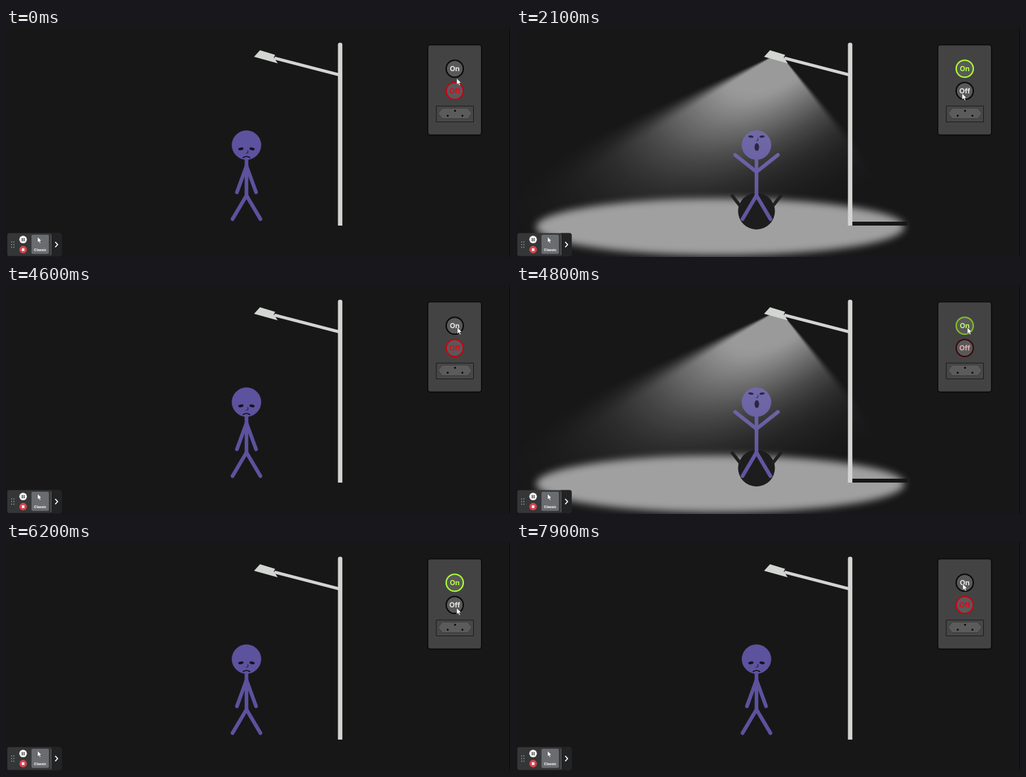
An HTML page with a canvas for the animation above (8000 ms loop, 766 by 350 pixels).

```html
<!DOCTYPE html>
<html lang="en">
<head>
<meta charset="utf-8">
<title>Street lamp</title>
<style>
html, body { margin: 0; width: 100%; height: 100%; overflow: hidden; background: #181717; }
canvas { display: block; }
</style>
</head>
<body>
<canvas id="stage" width="766" height="350"></canvas>
<script>
const W = 766, H = 350, LOOP = 8000, STEP = 100, FADE = 300;
const BG = '#181717', METAL = '#d3d5d3', BODY_X = 365.5;
const ctx = document.getElementById('stage').getContext('2d');

// each press toggles the lamp, which starts dark
const presses = [740, 2740, 4640, 6200];
const pointerHome = { x: 685, y: 77 };
const pointerMoves = [
  { from: 0, to: 300, x: 689, y: 68 },
  { from: 1500, to: 2100, x: 678, y: 100 },
  { from: 3300, to: 3600, x: 686, y: 65 },
  { from: 5100, to: 5900, x: 685, y: 101 },
  { from: 6500, to: 7000, x: 705, y: 131 },
  { from: 7000, to: 7200, x: 662, y: 129 },
  { from: 7300, to: 7900, x: 679, y: 64 }
];

const clamp = v => Math.max(0, Math.min(1, v));
const smooth = v => v * v * (3 - 2 * v);
const lerp = (a, b, p) => a + (b - a) * p;
const ramp = (t, from, to) => smooth(clamp((t - from) / (to - from)));
const mix = (a, b, p) => `rgb(${a.map((v, i) => Math.round(lerp(v, b[i], p)))})`;
const white = a => `rgba(255,255,255,${a})`;

function trace(g, points, closed) {
  g.beginPath();
  for (const [x, y] of points) g.lineTo(x, y);
  if (closed) g.closePath();
}
function stroke(width, color, g = ctx) {
  g.lineWidth = width;
  g.strokeStyle = color;
  g.stroke();
}
function poly(points, fill) {
  trace(ctx, points, true);
  ctx.fillStyle = fill;
  ctx.fill();
}
function line(points, width, color, g = ctx) {
  trace(g, points);
  stroke(width, color, g);
}
function oval(x, y, rx, ry, fill, tilt = 0, g = ctx) {
  g.beginPath();
  g.ellipse(x, y, rx, ry, tilt, 0, Math.PI * 2);
  g.fillStyle = fill;
  g.fill();
}
function box(x, y, w, h, r, fill) {
  ctx.beginPath();
  ctx.roundRect(x, y, w, h, r);
  ctx.fillStyle = fill;
  ctx.fill();
}
function label(text, x, y, size, color) {
  ctx.font = `700 ${size}px Inter, sans-serif`;
  ctx.textAlign = 'center';
  ctx.fillStyle = color;
  ctx.fillText(text, x, y);
}
function makeLayer(paint) {
  const layer = document.createElement('canvas');
  layer.width = W;
  layer.height = H;
  paint(layer.getContext('2d'));
  return layer;
}

// a soft-edged fan, dimmed by an oval falloff that leans to the lower left
const beam = makeLayer(g => {
  const fan = g.createConicGradient(0, 400, 38);
  for (let deg = 46; deg <= 160; deg++) {
    fan.addColorStop(deg / 360, white(ramp(deg, 48, 55) * ramp(deg, 157, 147)));
  }
  g.fillStyle = fan;
  g.fillRect(0, 0, W, H);

  g.globalCompositeOperation = 'destination-in';
  g.translate(400, 38);
  g.rotate(-0.61);
  g.scale(2, 1);
  const reach = 270, falloff = g.createRadialGradient(0, 0, 0, 0, 0, reach);
  for (let r = 0; r <= reach; r += 10) {
    falloff.addColorStop(r / reach, white(Math.min(0.57, 0.68 * Math.exp(-((r / 108) ** 2)))));
  }
  g.fillStyle = falloff;
  g.fillRect(-W, -W, W * 2, W * 2);
});

const floor = makeLayer(g => {
  g.filter = 'blur(6px)';
  oval(310.5, 304, 280, 43.5, '#a0a0a0', 0, g);
  g.filter = 'none';
  g.fillStyle = BG;
  g.fillRect(509, 296, 86, 6);
  oval(BODY_X, 280, 28, 28, '#1e1d1d', 0, g);
  for (const side of [-1, 1]) {
    line([[BODY_X + side * 24, 273], [BODY_X + side * 38, 255]], 5, '#222121', g);
  }
});

function drawLamp() {
  line([[408, 46], [506, 71.5]], 4.6, METAL);
  poly([[377, 44], [386, 34], [409, 41], [407, 45], [413, 54]], METAL);
  box(504.5, 22.5, 6.7, 279.5, [3, 3, 0, 0], METAL);
}

function drawFigure(lit) {
  const skin = ctx.createLinearGradient(0, 157, 0, 270);
  skin.addColorStop(0, lit ? '#716aa7' : '#5c529e');
  skin.addColorStop(1, lit ? '#6056a0' : '#5c529e');
  const fork = (joint, spread, end) =>
    line([[BODY_X - spread, end], [BODY_X, joint], [BODY_X + spread, end]], 5.6, skin);

  ctx.lineCap = 'round';
  line([[BODY_X, 198], [BODY_X, 256]], 5.6, skin);
  fork(256, 21.2, 292);
  if (lit) fork(220, 32.5, 194);
  else fork(211, 14.5, 251);
  oval(BODY_X, 179, 22.4, 22.4, skin);

  const ink = lit ? '#2b273f' : '#15121f', eyeY = lit ? 166 : 184.7;
  for (const side of [-1, 1]) {
    oval(BODY_X + side * 8.5, eyeY, 4, lit ? 1.7 : 2, ink, side * (lit ? -0.1 : 0.2));
  }
  const noseY = lit ? 168 : 187;
  line([[367.5, noseY], [368, noseY + 3.5], [365, noseY + 4.5]], 0.9, ink);
  if (lit) {
    oval(366, 182, 3.5, 6, ink);
  } else {
    ctx.beginPath();
    ctx.moveTo(BODY_X - 5, 198);
    ctx.quadraticCurveTo(BODY_X, 194.5, BODY_X + 5, 198);
    stroke(1.7, ink);
  }
  ctx.lineCap = 'butt';
}

function drawButton(text, y, glow, ring, ink) {
  oval(682, y, 13, 13, '#595959');
  stroke(2.1, mix([10, 10, 10], ring, glow));
  label(text, 682, y + 3.8, 10.8, mix([232, 232, 232], ink, glow));
}

function drawPanel(glow) {
  box(641, 25.8, 81.7, 137.8, 4, '#434343');
  stroke(1.6, '#0b0b0b');
  drawButton('On', 62.3, glow, [173, 255, 47], [181, 255, 70]);
  drawButton('Off', 96.2, 1 - glow, [200, 0, 18], [222, 10, 32]);

  const x = 682.5, y = 130.5;
  box(x - 28.5, y - 11.2, 56.5, 24.2, 0, '#474747');
  stroke(1, '#1b1b1b');
  const halves = [1, -1].flatMap(s => [[x - 25.5 * s, y], [x - 19.5 * s, y - 8 * s], [x + 19.5 * s, y - 8 * s]]);
  poly(halves, '#5b5b5b');
  stroke(0.8, '#393939');
  for (const side of [-1, 0, 1]) {
    oval(x + side * 11.2, y - 4 + Math.abs(side) * 7.5, 1.5, 1.5, '#080808');
  }
}

function drawArrow(x, y, scale) {
  ctx.save();
  ctx.translate(x, y);
  ctx.scale(scale, scale);
  poly([[0, 0], [0, 9.6], [2.2, 7.6], [3.8, 11], [5.4, 10.2], [3.9, 7], [6.8, 6.8]], '#fff');
  stroke(0.5, '#333');
  ctx.restore();
}

function drawToolbar() {
  box(2, 313.5, 82.5, 35, 3, '#353637');
  box(68.5, 313.5, 16, 35, [0, 3, 3, 0], '#222324');
  box(68, 316, 1, 31, 0, '#606264');
  for (let i = 0; i < 6; i++) oval(8.6 + i % 2 * 3.4, 327 + (i >> 1) * 4, 0.8, 0.8, '#b9babb');
  oval(26, 323.3, 5.8, 5.8, '#f4f4f4');
  for (const x of [24, 26.8]) box(x, 321, 1.3, 5, 0, '#333');
  oval(26, 338.8, 5.7, 5.7, '#d94350');
  box(24, 336.8, 4, 4, 0.5, '#fff');
  box(38.7, 316, 26.5, 29.3, 2, '#6a6c70');
  drawArrow(48, 319.3, 0.9);
  label('Classic', 52, 340.6, 5.3, '#fff');
  line([[74.8, 327], [78.5, 331], [74.8, 335]], 1.6, '#fff');
}

function pointerAt(t) {
  let { x, y } = pointerHome;
  for (const move of pointerMoves) {
    const p = ramp(t, move.from, move.to);
    x = lerp(x, move.x, p);
    y = lerp(y, move.y, p);
  }
  return [x, y];
}

function lampAt(t) {
  const past = presses.filter(at => at <= t);
  const lit = past.length % 2;
  const p = past.length ? Math.sqrt(ramp(t, past.at(-1), past.at(-1) + FADE)) : 1;
  return { lit, glow: lerp(1 - lit, lit, p) };
}

function draw(t) {
  const { lit, glow } = lampAt(t);
  box(0, 0, W, H, 0, BG);
  box(W - 1, 0, 1, H, 0, '#0b0b0b');
  if (lit) {
    ctx.drawImage(beam, 0, 0);
    ctx.drawImage(floor, 0, 0);
  }
  drawLamp();
  drawFigure(lit);
  drawPanel(glow);
  drawToolbar();
  drawArrow(...pointerAt(t), 1);
}

const start = performance.now();
function tick() {
  const t = (performance.now() - start) % LOOP;
  draw(Math.floor(t / STEP) * STEP);
  requestAnimationFrame(tick);
}
tick();
</script>
</body>
</html>
```
